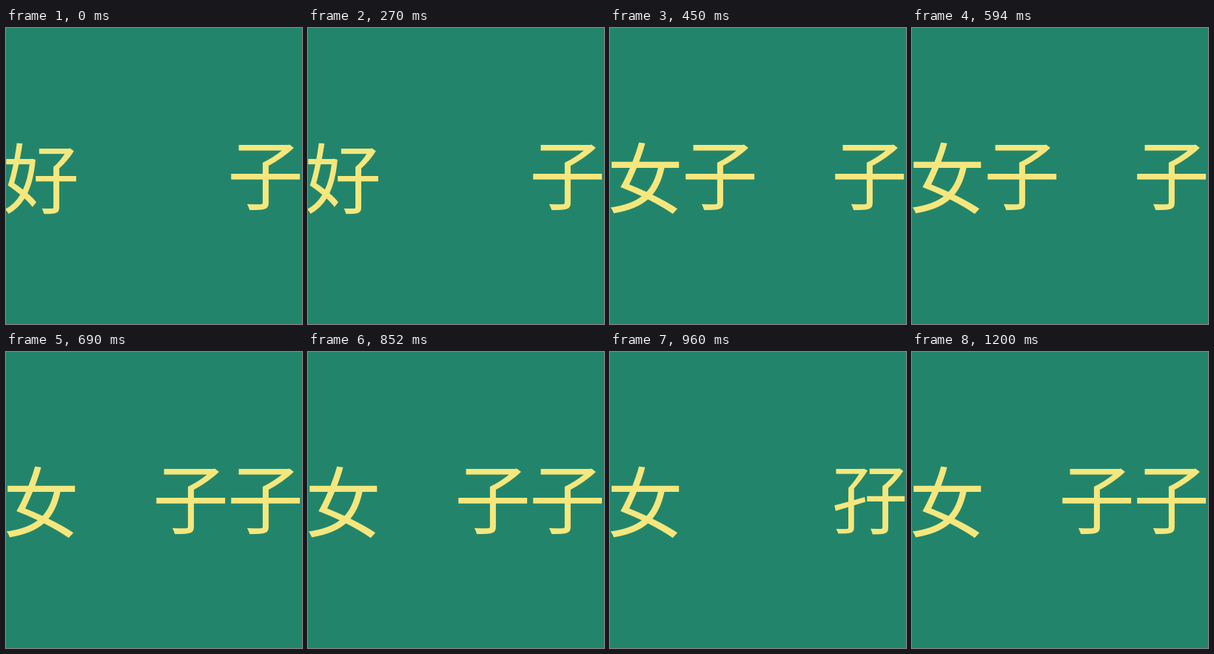
Write an HTML page that moves like this. It is 400 px wide and 400 px high and loops after 1380 ms.

```html
<!DOCTYPE html>
<html lang="zh-Hans">
<head>
<meta charset="utf-8">
<title>好孖</title>
<style>
  html, body { margin: 0; height: 100%; overflow: hidden; background: #22856b; }
  svg { display: block; width: 100vw; height: 100vh; }
  text {
    font: 400 103px "Noto Sans CJK SC", "Noto Sans CJK JP", "Noto Sans CJK", sans-serif;
    fill: #f5e77d;
    text-anchor: middle;
  }
</style>
</head>
<body>
<svg viewBox="0 0 400 400">
  <text id="line" x="47.5 148.5 249.5 350.5" y="243 238 238 238"></text>
</svg>
<script>
  // Each pose: end time in ms, then four cells padded with ideographic spaces.
  const poses = [
    [450, "好\u3000\u3000子"],
    [690, "女子\u3000子"],
    [960, "女\u3000子子"],
    [1200, "女\u3000\u3000孖"],
    [1380, "女\u3000子子"]
  ];
  const loop = 1380;
  const line = document.getElementById("line");
  const start = performance.now();

  function draw() {
    const t = (performance.now() - start) % loop;
    const [, chars] = poses.find(([end]) => t < end);
    if (line.textContent !== chars) line.textContent = chars;
    requestAnimationFrame(draw);
  }
  draw();
</script>
</body>
</html>
```
